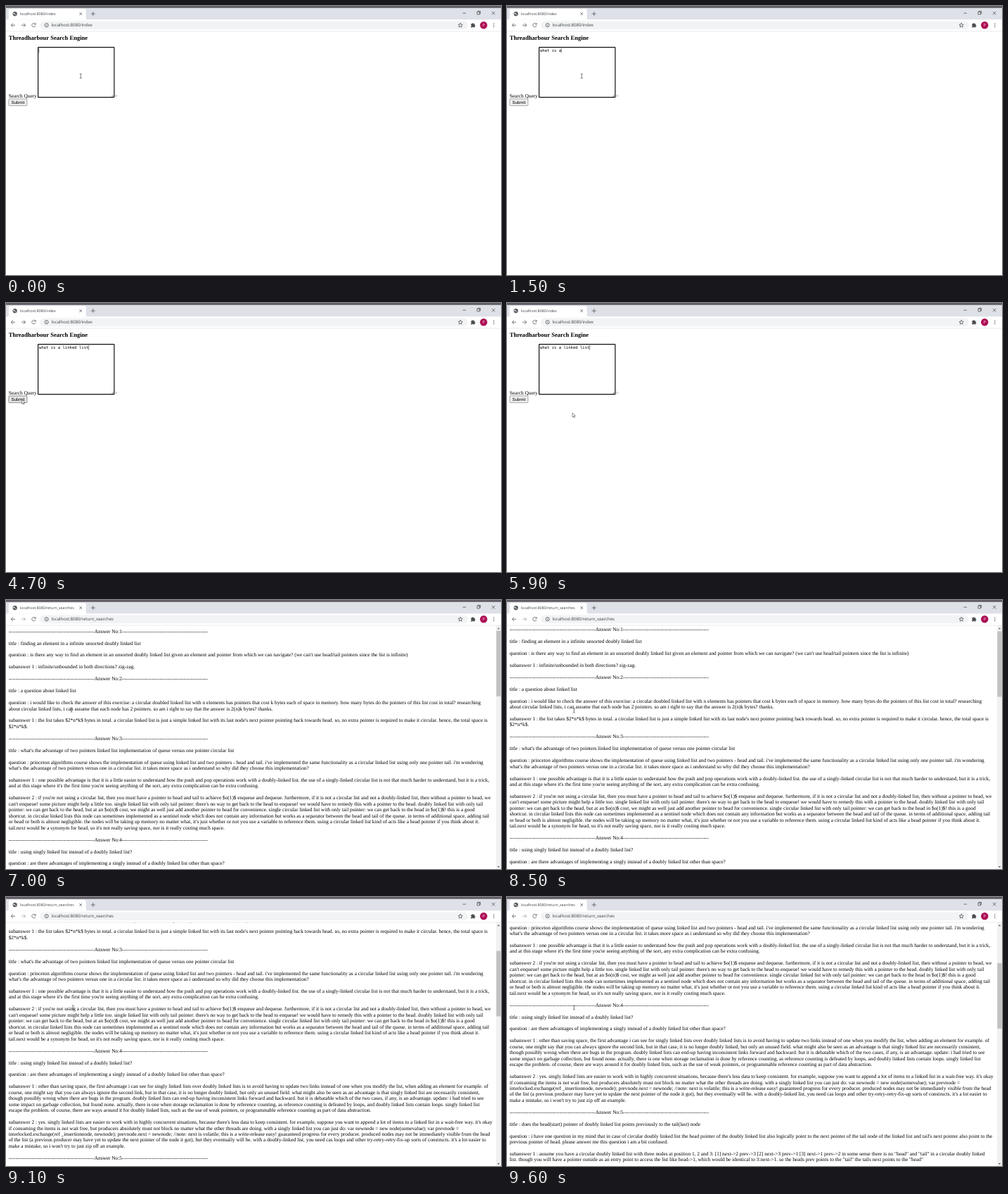
Write an HTML page that moves like this. It is 704 by 382 pixels and loops after 9700 ms.

```html
<!DOCTYPE html>
<html lang="en">
<head>
<meta charset="utf-8">
<title>Search engine demo</title>
<style>
html, body { margin: 0; width: 100%; height: 100%; overflow: hidden; background: #fff; }
svg { display: block; }
text { text-rendering: geometricPrecision; white-space: pre; }
.ui { font-family: "Open Sans", "Noto Sans", sans-serif; fill: #3c4043; }
.page { font: 7.333px "Liberation Serif", "Times New Roman", serif; fill: #000; }
.mono { font: 5.59px "DejaVu Sans Mono", monospace; fill: #000; }
.line { fill: none; stroke: #4a4d51; stroke-width: .75; }
</style>
</head>
<body>
<svg width="704" height="382" viewBox="0 0 704 382">
  <defs><clipPath id="view"><rect y="36.3" width="697" height="346"/></clipPath></defs>
  <rect width="704" height="382" fill="#fff"/>

  <g id="form" class="page">
    <text x="3.67" y="47.6" font-size="8.58" font-weight="bold">Threadharbour Search Engine</text>
    <text x="3.67" y="130">Search Query</text>
    <rect x="45.6" y="58.6" width="108.3" height="71" rx=".6" fill="#fff" stroke="#101010" stroke-width="1.2"/>
    <path class="line" d="M150.6 128.6l2.2-2.2M151.9 128.7l1-1" stroke-width=".4"/>
    <text x="154.5" y="130" fill="#666">&gt;</text>
    <text id="query" class="mono" x="46.9" y="65.1"></text>
    <path id="caret" d="M0 59.9v6.8" stroke="#333" stroke-width=".6"/>
    <rect id="button" x="3.9" y="131.9" width="26" height="9.7" rx="1" stroke-width=".6"/>
    <text x="7.4" y="138.9" style="font:6.11px 'Liberation Sans',Arial,sans-serif">Submit</text>
  </g>

  <g id="results">
    <g clip-path="url(#view)"><g id="list" class="page"></g></g>
    <rect x="697" y="36.3" width="7" height="346" fill="#f1f1f1"/>
    <path d="M698.7 41.3l1.8-2 1.8 2zM698.7 378l1.8 2 1.8-2z" fill="#606060"/>
    <rect id="thumb" x="697.4" y="43.8" width="6.2" height="93" fill="#c1c1c1"/>
  </g>

  <g id="browser">
    <rect width="704" height="19.5" fill="#dee1e8"/>
    <rect width="704" height="2.8" fill="#625c64"/>
    <path d="M1.5 19.5q2.4 0 2.4-2.4V6.6q0-2.7 2.7-2.7H111q2.7 0 2.7 2.7v10.5q0 2.4 2.4 2.4z" fill="#fff"/>
    <circle cx="12.7" cy="11.2" r="3.1" fill="#54585d"/>
    <path d="M10.6 9.8l2.2.2-.5 1.5-1.6.3zM13.2 11.6l1.5.3-1.1 1.7z" fill="#fff"/>
    <text id="title" class="ui" x="20" y="13.1" font-size="5.25"></text>
    <path class="line" d="M104.4 9.3l3.6 3.6m0-3.6l-3.6 3.6M120.8 11.1h6m-3-3v6"/>
    <path class="line" d="M649.6 10.2h4.4M670 8.3h3.6v3.6H670zM671 8.3v-1h3.6v3.6h-1M691 8l4.4 4.4m0-4.4L691 12.4" stroke-width=".6"/>
    <rect y="19.5" width="704" height="16.3" fill="#fff"/>
    <path d="M0 36h704" stroke="#d5d7dc" stroke-width=".5"/>
    <rect x="48" y="21.4" width="609" height="11.8" rx="5.9" fill="#f1f3f4"/>
    <path class="line" d="M13 27.2H7.3m2.7-2.7l-2.7 2.7 2.7 2.7"/>
    <path id="forward" class="line" d="M22 27.2h5.7m-2.7-2.7l2.7 2.7-2.7 2.7"/>
    <path class="line" d="M41.6 25.4A2.7 2.7 0 1 0 42 28.1M42.2 24.1v2.1h-2.1"/>
    <circle class="line" cx="57.7" cy="27.2" r="2.6"/>
    <path class="line" d="M57.7 26.7v1.9M57.7 25.4v.7"/>
    <text id="url" class="ui" x="64.6" y="29.3" font-size="6.05"></text>
    <path class="line" d="M646.2 24.1l.9 2.1 2.2.2-1.7 1.5.5 2.2-1.9-1.2-1.9 1.2.5-2.2-1.7-1.5 2.2-.2z" stroke-width=".6"/>
    <path d="M661.3 25.3h1.6a1 1 0 0 1 2 0h1.6v1.6a1 1 0 0 1 0 2v1.5h-1.7a1 1 0 0 0-1.9 0h-1.6v-1.7a1 1 0 0 0 0-1.8z" fill="#4a4d51"/>
    <circle cx="679.3" cy="27.2" r="5.2" fill="#ad0f55"/>
    <text class="ui" x="679.3" y="29.2" font-size="5.4" text-anchor="middle" style="fill:#fff">P</text>
    <g fill="#4a4d51"><circle cx="693.8" cy="24.9" r=".65"/><circle cx="693.8" cy="27.2" r=".65"/><circle cx="693.8" cy="29.5" r=".65"/></g>
  </g>

  <path id="beam" class="line" d="M-1.5 -3h1.1l.4.4.4-.4h1.1M0-2.6v5.2M-1.5 3h1.1l.4-.4.4.4h1.1" stroke="#333" stroke-width=".6"/>
  <path id="arrow" d="M0 0v6l1.4-1.3 1 2.2 1-.4-1-2.1h1.9z" fill="#fff" stroke="#222" stroke-width=".5"/>
</svg>
<script>
const LOOP = 9700, LOADED = 6200, LEADING = 8.457, CHAR = 3.366;
const QUERY = "what is a linked list";
// Time at which each letter of the query appears
const KEYS = [500, 600, 700, 800, 1000, 1100, 1300, 1400, 1500, 1600, 1800,
  2000, 2200, 2400, 2500, 2700, 2800, 3000, 3200, 3300, 3400];
const MOVE_X = [[3900, 106.3], [4600, 22.6], [4900, 22.6], [5800, 93], [8100, 93], [8400, 95.3]];
const MOVE_Y = [[3900, 99.5], [4600, 137.2], [4900, 137.2], [5800, 156], [8100, 156], [8400, 157]];
const SCROLL = [[8400, 0], [8500, 2.5], [9100, 122], [9600, 187]];

// "#n" marks the rule above answer n
const ANSWERS = `#1

title : finding an element in a infinite unsorted doubly linked list

question : is there any way to find an element in an unsorted doubly linked list given an element and pointer from which we can navigate? (we can't use head/tail pointers since the list is infinite)

subanswer 1 : infinite/unbounded in both directions? zig-zag.

#2

title : a question about linked list

question : i would like to check the answer of this exercise: a circular doubled linked list with n elements has pointers that cost k bytes each of space in memory. how many bytes do the pointers of this list cost in total? researching
about circular linked lists, i can assume that each node has 2 pointers. so am i right to say that the answer is 2(n)k bytes? thanks.

subanswer 1 : the list takes $2*n*k$ bytes in total. a circular linked list is just a simple linked list with its last node's next pointer pointing back towards head. so, no extra pointer is required to make it circular. hence, the total space is
$2*n*k$.

#3

title : what's the advantage of two pointers linked list implementation of queue versus one pointer circular list

question : princeton algorithms course shows the implementation of queue using linked list and two pointers - head and tail. i've implemented the same functionality as a circular linked list using only one pointer tail. i'm wondering
what's the advantage of two pointers versus one in a circular list. it takes more space as i understand so why did they choose this implementation?

subanswer 1 : one possible advantage is that it is a little easier to understand how the push and pop operations work with a doubly-linked list. the use of a singly-linked circular list is not that much harder to understand, but it is a trick,
and at this stage where it's the first time you're seeing anything of the sort, any extra complication can be extra confusing.

subanswer 2 : if you're not using a circular list, then you must have a pointer to head and tail to achieve $o(1)$ enqueue and dequeue. furthermore, if it is not a circular list and not a doubly-linked list, then without a pointer to head, we
can't enqueue! some picture might help a little too. single linked list with only tail pointer: there's no way to get back to the head to enqueue! we would have to remedy this with a pointer to the head. doubly linked list with only tail
pointer: we can get back to the head, but at an $o(n)$ cost, we might as well just add another pointer to head for convenience. single circular linked list with only tail pointer: we can get back to the head in $o(1)$! this is a good
shortcut. in circular linked lists this node can sometimes implemented as a sentinel node which does not contain any information but works as a separator between the head and tail of the queue. in terms of additional space, adding tail
or head or both is almost negligible. the nodes will be taking up memory no matter what, it's just whether or not you use a variable to reference them. using a circular linked list kind of acts like a head pointer if you think about it.
tail.next would be a synonym for head, so it's not really saving space, nor is it really costing much space.

#4

title : using singly linked list instead of a doubly linked list?

question : are there advantages of implementing a singly instead of a doubly linked list other than space?

subanswer 1 : other than saving space, the first advantage i can see for singly linked lists over doubly linked lists is to avoid having to update two links instead of one when you modify the list, when adding an element for example. of
course, one might say that you can always ignore the second link, but in that case, it is no longer doubly linked, but only an unused field. what might also be seen as an advantage is that singly linked list are necessarily consistent,
though possibly wrong when there are bugs in the program. doubly linked lists can end-up having inconsistent links forward and backward. but it is debatable which of the two cases, if any, is an advantage. update: i had tried to see
some impact on garbage collection, but found none. actually, there is one when storage reclamation is done by reference counting, as reference counting is defeated by loops, and doubly linked lists contain loops. singly linked list
escape the problem. of course, there are ways around it for doubly linked lists, such as the use of weak pointers, or programmable reference counting as part of data abstraction.

subanswer 2 : yes. singly linked lists are easier to work with in highly concurrent situations, because there's less data to keep consistent. for example, suppose you want to append a lot of items to a linked list in a wait-free way. it's okay
if consuming the items is not wait free, but producers absolutely must not block no matter what the other threads are doing. with a singly linked list you can just do: var newnode = new node(somevalue); var prevnode =
interlocked.exchange(ref _insertionnode, newnode); prevnode.next = newnode; //note: next is volatile; this is a write-release easy! guaranteed progress for every producer. produced nodes may not be immediately visible from the head
of the list (a previous producer may have yet to update the next pointer of the node it got), but they eventually will be. with a doubly-linked list, you need cas loops and other try-retry-retry-fix-up sorts of constructs. it's a lot easier to
make a mistake, so i won't try to just zip off an example.

#5

title : does the head(start) pointer of doubly linked list points previously to the tail(last) node

question : i have one question in my mind that in case of circular doubly linked list the head pointer of the doubly linked list also logically point to the next pointer of the tail node of the linked list and tail's next pointer also point to the
previous pointer of head. please answer me this question i am a bit confused.

subanswer 1 : assume you have a circular doubly linked list with three nodes at position 1, 2 and 3: [1] next->2 prev->3 [2] next->3 prev->1 [3] next->1 prev->2 in some sense there is no "head" and "tail" in a circular doubly linked
list. though you will have a pointer outside as an entry point to access the list like head->1, which would be identical to 3:next->1. so the heads prev points to the "tail" the tails next points to the "head"`;

const $ = id => document.getElementById(id);
const set = (id, name, value) => $(id).setAttribute(name, value);
const show = (id, on) => set(id, "visibility", on ? "visible" : "hidden");

const rule = "-".repeat(50);
ANSWERS.split("\n").forEach((line, i) => {
  if (!line) return;
  const el = document.createElementNS("http://www.w3.org/2000/svg", "text");
  el.setAttribute("x", 3.67);
  el.setAttribute("y", 46.6 + i * LEADING);
  el.textContent = line[0] === "#" ? `${rule}Answer No:${line.slice(1)}${rule}` : line;
  $("list").append(el);
});

// Linear interpolation through [time, value] pairs
function track(points, t) {
  if (t <= points[0][0]) return points[0][1];
  for (let i = 1; i < points.length; i++) {
    const [t0, a] = points[i - 1], [t1, b] = points[i];
    if (t <= t1) return a + (b - a) * (t - t0) / (t1 - t0);
  }
  return points[points.length - 1][1];
}

function draw(t) {
  const loaded = t >= LOADED;
  const x = track(MOVE_X, t), y = track(MOVE_Y, t), scroll = track(SCROLL, t);
  const typed = KEYS.filter(k => k <= t).length;
  const address = "localhost:8080/" + (loaded ? "return_searches" : "index");
  const inBox = x > 45 && x < 154 && y > 58 && y < 130;
  const onButton = x > 4 && x < 30 && y > 132 && y < 142;

  show("form", !loaded);
  show("results", loaded);
  $("title").textContent = $("url").textContent = address;
  set("forward", "opacity", loaded ? .5 : 1);

  $("query").textContent = QUERY.slice(0, typed);
  set("caret", "transform", `translate(${46.9 + typed * CHAR} 0)`);
  set("button", "fill", onButton ? "#e5e5e5" : "#efefef");
  set("button", "stroke", onButton ? "#4f4f4f" : "#767676");

  set("list", "transform", `translate(0 ${-scroll})`);
  set("thumb", "y", 43.8 + scroll * .268);

  show("beam", loaded || inBox);
  show("arrow", !loaded && !inBox);
  for (const id of ["beam", "arrow"]) set(id, "transform", `translate(${x} ${y})`);
}

const start = performance.now();
let last = -1;
function tick() {
  const t = Math.floor((performance.now() - start) % LOOP / 100) * 100;
  if (t !== last) draw(last = t);
  requestAnimationFrame(tick);
}
tick();
</script>
</body>
</html>
```
